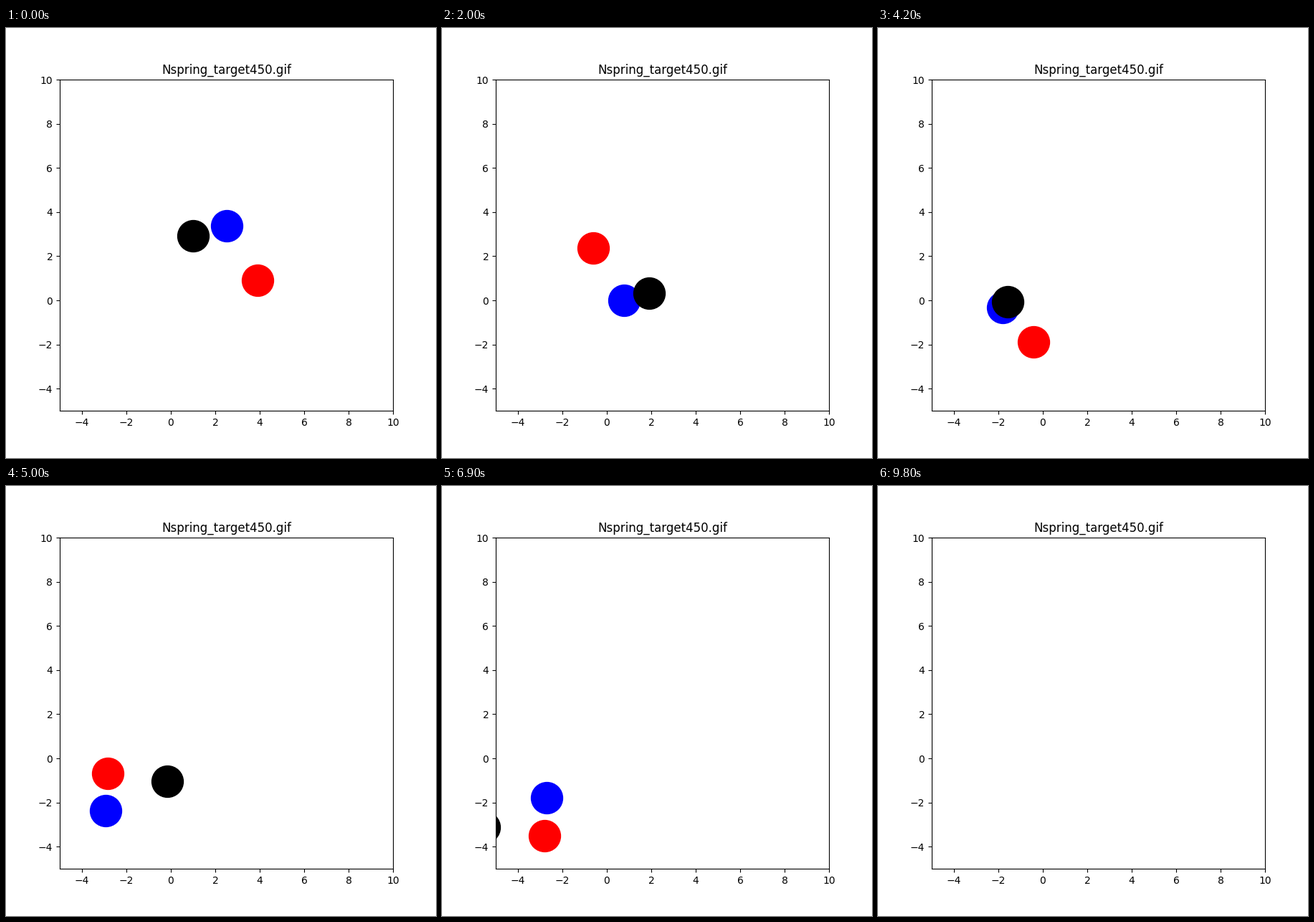
Animation, 600 px wide and 600 px high, one loop 9830 ms. Source, as a matplotlib script:

```python
import numpy as np
import matplotlib.pyplot as plt
from matplotlib.animation import FuncAnimation

STEPS = 99
LOOP_MS = 9830
DT = 0.1
SUBSTEPS = 4
COLORS = ["red", "blue", "black"]
BALL_SIZE = np.sqrt(1000)

# Where the red, blue and black balls start, and two poses they swing through
START = np.array([(3.89, 0.90), (2.53, 3.39), (1.01, 2.92)])
WAYPOINTS = {
    34: [(0.72, -1.38), (0.13, 1.02), (-2.51, -0.13)],
    81: [(-4.21, -4.59), (-5.40, -3.49), (-4.63, -3.04)],
}
# Rough launch: three velocities, spring stiffness, spring rest length
GUESS = np.array([-1.5, -0.6, -2.4, -1.7, 1.3, 0.1, 1.0, 0.2])


def simulate(launches):
    """Equal balls joined by springs, drifting freely; one row per launch."""
    vel = launches[:, :6].reshape(-1, 3, 2).copy()
    pos = np.tile(START, (len(launches), 1, 1))
    stiffness = launches[:, 6].reshape(-1, 1, 1)
    rest = launches[:, 7].reshape(-1, 1, 1, 1)
    h = DT / SUBSTEPS
    track = [pos.copy()]
    for _ in range(STEPS - 1):
        for _ in range(SUBSTEPS):
            pos += vel * h / 2
            gap = pos[:, :, None] - pos[:, None]
            dist = np.sqrt((gap ** 2).sum(-1, keepdims=True)) + 1e-9
            vel -= h * stiffness * ((1 - rest / dist) * gap).sum(2)
            pos += vel * h / 2
        track.append(pos.copy())
    return np.stack(track, axis=1)


def refine(launch, rounds=10, eps=1e-4):
    """Adjust the launch by least squares so it meets the waypoints."""
    goal = np.array(list(WAYPOINTS.values()))
    nudges = np.vstack([np.zeros(len(launch)), eps * np.eye(len(launch))])
    for _ in range(rounds):
        poses = simulate(launch + nudges)[:, list(WAYPOINTS)]
        miss = (poses - goal).reshape(len(nudges), -1)
        slope = (miss[1:] - miss[0]).T / eps
        launch = launch - np.linalg.lstsq(slope, miss[0], rcond=None)[0]
    return launch


path = simulate(refine(GUESS)[None])[0]

fig, ax = plt.subplots(figsize=(6, 6), dpi=100)
fig.subplots_adjust(left=0.125, right=0.9, bottom=0.11, top=0.88)
ax.set_xlim(-5, 10)
ax.set_ylim(-5, 10)
ax.set_title("Nspring_target450.gif")
balls = [ax.plot([], [], "o", color=c, markersize=BALL_SIZE)[0] for c in COLORS]


def draw(step):
    for ball, (x, y) in zip(balls, path[step]):
        ball.set_data([x], [y])
    return balls


anim = FuncAnimation(fig, draw, frames=STEPS, interval=LOOP_MS / STEPS,
                     repeat=True, repeat_delay=0)
plt.show()
```
